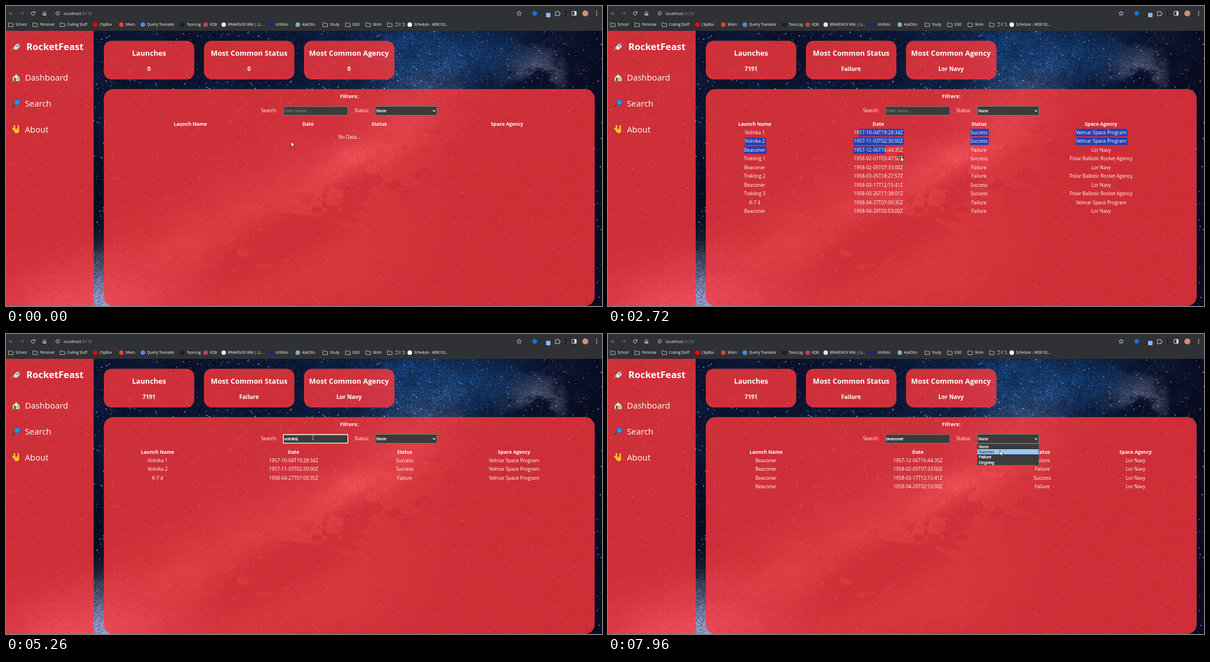
An HTML page with a canvas that plays this animation: 1054x531 px, repeating every 8000 ms.

```html
<!DOCTYPE html>
<html lang="en">
<head>
<meta charset="utf-8">
<title>Launch dashboard</title>
<style>
  html, body { margin: 0; width: 100%; height: 100%; overflow: hidden; background: #303134; }
  canvas { display: block; }
</style>
</head>
<body>
<canvas id="stage" width="1054" height="531"></canvas>
<script>
const W = 1054, H = 531, TOP = 44, LOOP = 8000;
const SANS = '"Open Sans", "Noto Sans", sans-serif';
const FORM = '"Liberation Sans", Arial, sans-serif';
const stage = document.getElementById('stage').getContext('2d');
const backdrop = document.createElement('canvas');
backdrop.width = W;
backdrop.height = H;
let ctx = backdrop.getContext('2d');

// ---------- drawing helpers ----------
// y is the middle of the capital letters
function text(str, x, y, size, { weight = 400, color = '#fff', align = 'left', font = SANS } = {}) {
  ctx.font = `${weight} ${size}px ${font}`;
  ctx.textAlign = align;
  ctx.fillStyle = color;
  ctx.fillText(str, x, y + size * 0.357);
  return ctx.measureText(str).width;
}
function formText(str, x, y, color = '#fff') {
  const width = text(str, x, y, 7.32, { color, font: FORM });
  ctx.strokeStyle = color;
  ctx.lineWidth = 0.25;
  ctx.strokeText(str, x, y + 7.32 * 0.357);
  return width;
}
function box(x, y, w, h, r, fill, stroke, line = 1) {
  ctx.beginPath();
  ctx.roundRect(x, y, w, h, r);
  if (fill) { ctx.fillStyle = fill; ctx.fill(); }
  if (stroke) { ctx.strokeStyle = stroke; ctx.lineWidth = line; ctx.stroke(); }
}
function dot(x, y, r, fill, stroke, line = 1) {
  box(x - r, y - r, 2 * r, 2 * r, r, fill, stroke, line);
}
function path(d, x, y, fill, stroke, line = 1) {
  ctx.save();
  ctx.translate(x, y);
  const shape = new Path2D(d);
  if (fill) { ctx.fillStyle = fill; ctx.fill(shape); }
  if (stroke) { ctx.strokeStyle = stroke; ctx.lineWidth = line; ctx.stroke(shape); }
  ctx.restore();
}

// ---------- night sky ----------
function hash(x, y) {
  let h = Math.imul(x, 374761393) ^ Math.imul(y, 668265263);
  h = Math.imul(h ^ (h >>> 13), 1274126177);
  return ((h ^ (h >>> 16)) >>> 0) / 4294967296;
}
function smooth(a, b, v) {
  const u = Math.min(1, Math.max(0, (v - a) / (b - a)));
  return u * u * (3 - 2 * u);
}
function noise(x, y) {
  const ix = Math.floor(x), iy = Math.floor(y);
  const u = smooth(0, 1, x - ix), v = smooth(0, 1, y - iy);
  const a = hash(ix, iy), b = hash(ix + 1, iy), c = hash(ix, iy + 1), d = hash(ix + 1, iy + 1);
  return a + (b - a) * u + (c - a) * v + (a - b - c + d) * u * v;
}
function fbm(x, y) {
  let sum = 0, total = 0;
  for (let i = 0, amp = 1; i < 5; i++, amp *= 0.6, x *= 2.1, y *= 2.1) {
    sum += amp * noise(x + i * 17, y);
    total += amp;
  }
  return sum / total;
}
const bell = (v, mid, spread) => Math.exp(-(((v - mid) / spread) ** 2));

function drawSky() {
  const image = ctx.createImageData(W, H);
  for (let y = TOP; y < H; y++) {
    for (let x = 0; x < W; x++) {
      // signed distance below the axis of the galaxy
      const d = ((x - 230) * 380 + (y - 480) * 720) / 814;
      const n = fbm(x / 62, y / 44);
      const band = bell(d, -5, 70) * (0.2 + 0.6 * n) * (1 - smooth(720, 850, x));
      const core = bell(x, 630, 100) * bell(d, 2, 30) * n;
      const haze = bell(d, 140, 110) * (1 - smooth(600, 850, x)) * (0.15 + 0.5 * n);
      const cloud = bell(x, 945, 50) * bell(y, 115, 38) * smooth(0.38, 0.58, n);
      const dust = smooth(0.46, 0.52, n) * bell(d, 60, 50) * smooth(260, 450, x);
      const light = (0.8 * band + 1.1 * core + 0.7 * haze) * (1 - 0.9 * Math.min(1, dust * 1.3)) + 0.4 * cloud;
      const blue = bell(x, 760, 170) * bell(y, 80, 85) * (0.2 + 0.9 * n)
        + 0.3 * (1 - smooth(500, 800, x)) * (1 - smooth(200, 400, y)) * n;
      const corner = bell(x, 130, 140) * bell(y, 530, 70);
      const grain = 0.6 + 0.8 * hash(x, y);
      const i = (y * W + x) * 4;
      image.data[i] = (8 + 150 * light + 12 * blue + 65 * corner) * grain;
      image.data[i + 1] = (10 + 135 * light + 62 * blue + 80 * corner) * grain;
      image.data[i + 2] = (30 + 130 * light + 105 * blue + 110 * corner) * grain;
      image.data[i + 3] = 255;
    }
  }
  ctx.putImageData(image, 0, 0);
  for (let i = 0; i < 9000; i++) {
    const x = hash(i, 1) * W, y = TOP + hash(i, 2) * (H - TOP);
    if (hash(i, 5) < 0.6 * smooth(650, 950, x) * smooth(200, 330, y) * (1 - smooth(1035, 1041, x))) continue;
    const bright = hash(i, 3) ** 3, size = 0.7 + bright * 1.2;
    ctx.fillStyle = `rgba(${120 + 100 * hash(i, 4)}, 190, 255, ${0.2 + 0.75 * bright})`;
    ctx.fillRect(x, y, size, size);
  }
}

// ---------- browser bars ----------
function folder(x) {
  path('M0.5 1.5h3l1.2 1.3h4v5.4h-8.2z', x, 28.3, null, '#d5d7da', 0.8);
}
function drawBrowser() {
  const ink = '#e3e4e6', dim = '#85878a';
  ctx.fillStyle = '#303134';
  ctx.fillRect(0, 0, W, TOP);
  path('M3.5 -3L0.5 0l3 3M0.5 0h6.5', 5, 13, null, dim);
  path('M3.5 -3l3 3l-3 3M6.5 0h-6.5', 25, 13, null, '#6b6d70');
  path('M2.4 -2A3.1 3.1 0 1 0 3.1 0.5M3.2 -3.2v2.2h-2.2', 48, 13, null, ink);
  path('M-3.3 0L0 -3.2L3.3 0M-2.4 -0.6v4h1.6v-2.4h1.6v2.4h1.6v-4', 68, 13, null, ink);
  dot(91.5, 13, 3.2, null, ink, 0.8);
  path('M0 -0.4v2M0 -1.8v0.8', 91.5, 13, null, ink, 0.9);
  const host = text('localhost', 102, 13, 7.4, { color: '#eee' });
  text(':5173', 102 + host, 13, 7.4, { color: '#989b9f' });

  path('M0 -4l1.1 2.7 2.9.2-2.2 1.9.7 2.8L0 2.1l-2.5 1.5.7-2.8L-4 -1.1l2.9-.2z', 907.5, 13, null, ink, 0.8);
  dot(935, 13, 4, '#1473d8');
  box(955, 12, 8, 8, 1.5, '#8fb4ee');
  path('M-3.5 -2.2h2.2a1.3 1.3 0 1 1 2.6 0h2v2.2a1.3 1.3 0 1 1 0 2.4v2h-6.8v-2.2a1.2 1.2 0 0 0 0-2.2z', 975, 12.6, null, ink, 0.9);
  ctx.fillStyle = '#111';
  ctx.fillRect(989, 8, 1.2, 10);
  box(1001, 9.5, 7.5, 7, 0.5, null, ink, 0.9);
  ctx.fillStyle = ink;
  ctx.fillRect(1005.3, 9.5, 3.2, 7);
  dot(1024.5, 13, 5.3, '#d08c78');
  for (const y of [9.5, 13, 16.5]) dot(1044.5, y, 0.9, ink);

  const folders = [[4, 'School'], [47, 'Personal'], [95, 'Coding Stuff'], [560, 'Study'],
    [600, 'EGD'], [636, 'Work'], [674, 'ゴミコ']];
  for (const [x, label] of folders) {
    folder(x);
    text(label, x + 13, 33, 6.25, { font: '"Open Sans", "Noto Sans CJK JP", "Noto Sans CJK", sans-serif' });
  }
  const sites = [[158, 'ClipBox', '#f00'], [204, 'Mivro', '#ea4335'], [242, 'Querly Translate', '#4d87ee'],
    [312, 'ToonLog', '#16202f'], [353, 'KQB', '#c5414e'], [385, 'BRAVENOX Wiki | Li...', '#dfe3e8'],
    [469, 'Unifolio', '#20228c'], [516, 'AskOtto', '#7ab8a6'], [714, 'Schedule - WEB102...', '#fff']];
  for (const [x, label, color] of sites) {
    dot(x, 33, 4, color);
    text(label, x + 7.5, 33, 6.25);
  }
}

// ---------- fixed parts of the page ----------
function drawPage() {
  const red = 'rgba(255, 56, 60, .8)';
  box(0, TOP, 155, H - TOP, 0, red);
  for (const x of [173, 350, 527]) box(x, 61.5, 160, 68.5, 14, red);
  box(173, 147, 868, 384, 17, red);

  // rocket
  path('M-8 6l3-5 3 3z', 18, 73, '#f5a623');
  path('M-5 -2l4-2 4 5-2 5-2-3-3-2zM-6 2l4 4-3 1z', 18, 73, '#a3263c');
  path('M8 -8C2 -8-3 -3-5 1l4 4C4 3 8 -2 8 -8z', 18, 73, '#dce3ea');
  path('M8 -8q-4 0-6 1.5l4.5 4.5q1.5-2 1.5-6z', 18, 73, '#c93a55');
  dot(20, 71, 1.7, '#4b7fae');
  // house
  path('M-6 0L0 -6L6 0V7H-6z', 18, 126, '#f2e2c4');
  path('M-8 0L0 -8L8 0L6.5 1.5L0 -5L-6.5 1.5z', 18, 126, '#a9583d');
  box(14, 127, 3.5, 6, 0, '#7b4a2d');
  box(19, 127, 3.5, 3.5, 0, '#63b7e6');
  box(11, 132, 5, 2, 1, '#58a846');
  box(20, 132, 5, 2, 1, '#58a846');
  // magnifier
  path('M-3 3L-7 7', 18, 172, null, '#3d4552', 2.4);
  dot(20, 170.5, 5, '#1e9be8', '#27506f', 1);
  // hand
  path('M-3 -7v8M3.5 -7v8M-6.5 -2l4 5', 18, 218, null, '#fcc42f', 2.6);
  path('M-4 -1h9q1 5-2 8h-4q-3-2-3-8z', 18, 218, '#fcc42f');
  path('M-1 -1v3M1.5 -1v3', 18, 218, null, '#c98a16', 1);

  text('RocketFeast', 36, 72.5, 16.6, { weight: 700 });
  text('Dashboard', 33.5, 126.5, 14.8, { weight: 500 });
  text('Search', 33.5, 172.5, 14.8, { weight: 500 });
  text('About', 33.5, 218.5, 14.8, { weight: 500 });

  const title = { weight: 700, align: 'center' };
  text('Launches', 253, 83.5, 12.7, title);
  text('Most Common Status', 430, 83.5, 12.7, title);
  text('Most Common Agency', 606.5, 83.5, 12.7, title);
  text('Filters:', 607, 159.5, 9.5, title);
  text('Search:', 451, 185.5, 8.3);
  text('Status:', 616, 185.5, 8.3);
  box(653, 177.5, 109, 16, 1, '#3b3b3b', '#858585', 0.9);
  formText('None', 655, 185.5);
  path('M-2.2 -1.2L0 1.2L2.2 -1.2', 757, 185.5, null, '#fff', 1.2);
}

// ---------- data ----------
const VELMAR = 'Velmar Space Program', NAVY = 'Lor Navy', ARMY = 'Polar Ballistic Rocket Agency';
const launches = [
  ['Volnika 1', '1957-10-04T19:28:34Z', 'Success', VELMAR],
  ['Volnika 2', '1957-11-03T02:30:00Z', 'Success', VELMAR],
  ['Beaconer', '1957-12-06T16:44:35Z', 'Failure', NAVY],
  ['Trekling 1', '1958-02-01T03:47:56Z', 'Success', ARMY],
  ['Beaconer', '1958-02-05T07:33:00Z', 'Failure', NAVY],
  ['Trekling 2', '1958-03-05T18:27:57Z', 'Failure', ARMY],
  ['Beaconer', '1958-03-17T12:15:41Z', 'Success', NAVY],
  ['Trekling 3', '1958-03-26T17:38:01Z', 'Success', ARMY],
  ['K-7 4', '1958-04-27T07:00:35Z', 'Failure', VELMAR],
  ['Beaconer', '1958-04-29T02:53:00Z', 'Failure', NAVY]
];
const headers = ['Launch Name', 'Date', 'Status', 'Space Agency'];
const columns = {
  empty: [326, 534, 660, 886],
  all: [259.5, 478, 656, 872],
  [VELMAR]: [268, 508.5, 705, 898.5],
  [NAVY]: [279.5, 548, 768, 933]
};
const ROW = 15.44;

// ---------- timeline ----------
const LOADED = 1780, FOCUS = 3490, SELECT_ALL = 5600, CLEAR = 5690, OPEN = 7720;
const DRAG = 2600, DRAG_END = 3080;
const firstKeys = [4340, 4460, 4590, 4730, 4950, 5010, 5260];
const secondKeys = [6060, 6240, 6390, 6450, 6690, 6760, 6840, 7050];
const pointer = [[0, 504, 240], [60, 506, 241], [430, 561, 265], [680, 558, 264], [820, 553, 258],
  [1050, 640, 224], [1240, 688, 268], [1450, 626, 305], [1570, 626, 302], [1720, 626, 302],
  [1780, 626, 306], [2100, 560, 290], [2570, 443, 222], [2630, 455, 234], [2720, 517, 266],
  [2860, 600, 325], [2960, 622, 345], [3080, 612, 330], [3160, 597, 310], [3430, 575, 183],
  [3640, 575, 183], [3790, 665, 181], [4000, 543, 183], [7250, 543, 183], [7400, 600, 246],
  [7540, 700, 215], [7660, 712, 186], [7760, 708, 186], [7960, 693, 206]];

function pointerAt(t) {
  const i = pointer.findIndex(k => k[0] > t);
  if (i < 0) return pointer.at(-1).slice(1);
  const [t0, x0, y0] = pointer[i - 1], [t1, x1, y1] = pointer[i];
  const u = (t - t0) / (t1 - t0);
  return [x0 + (x1 - x0) * u, y0 + (y1 - y0) * u];
}
const pressed = (keys, t) => keys.filter(k => k <= t).length;
const queryAt = t => t < CLEAR
  ? 'volnika'.slice(0, pressed(firstKeys, t))
  : 'beaconer'.slice(0, pressed(secondKeys, t));

// ---------- moving parts ----------
function drawSelection(t, row, col, center, width) {
  const [x, y] = pointerAt(t - 40);
  const last = Math.floor((y - 217) / ROW);
  let left = center - width / 2, right = left + width + 2;
  if (row > last || (row === 0 && col === 0)) return;
  if (row === 0 && col === 1) left = 443;
  if (row === last) right = Math.min(right, x);
  if (right > left) box(left, 217.5 + row * ROW, right - left, 13, 0, '#213fb3');
}
function drawTable(t, query) {
  const agency = { v: VELMAR, b: NAVY }[query[0]];
  const rows = t < LOADED ? [] : launches.filter(r => !agency || r[3] === agency);
  const centers = columns[t < LOADED ? 'empty' : agency || 'all'];
  headers.forEach((h, c) => text(h, centers[c], 208.5, 8.5, { weight: 700, align: 'center' }));
  if (t < 1570) text('No Data...', 607, 232, 8.4, { align: 'center' });
  rows.forEach((cells, r) => cells.forEach((cell, c) => {
    ctx.font = `400 8.45px ${SANS}`;
    if (t >= DRAG && t < DRAG_END) drawSelection(t, r, c, centers[c], ctx.measureText(cell).width);
    text(cell, centers[c], 224 + r * ROW, 8.45, { align: 'center' });
  }));
}
function drawInput(t, query) {
  const focused = t >= FOCUS && t < OPEN;
  box(490.5, 178, 114, 15.2, 1, '#3b3b3b', focused ? '#fff' : '#858585', focused ? 1.3 : 0.9);
  const marked = t >= SELECT_ALL && t < CLEAR;
  if (marked) box(492, 181, 23.5, 9, 0, '#3367d1');
  if (!query) formText('Enter Name...', 492, 185.5, '#757575');
  const end = 492 + (query ? formText(query, 492, 185.5) : 0);
  if (focused && !marked) {
    ctx.fillStyle = '#fff';
    ctx.fillRect(end + 0.3, 181.5, 0.7, 8);
  }
}
function drawOptions(t) {
  if (t < OPEN) return;
  box(653, 194.5, 109, 37.5, 0, '#3b3b3b', '#626262', 0.6);
  const active = t < 7860 ? 0 : 1;
  ['None', 'Success', 'Failure', 'Ongoing'].forEach((label, i) => {
    const y = 199.3 + i * 9.2;
    if (i === active) box(653.3, y - 4.6, 108.4, 9.2, 0, '#99c8ff');
    formText(label, 655.5, y, i === active ? '#3b4a5c' : '#fff');
  });
}
function drawPointer(t) {
  const [x, y] = pointerAt(t);
  if (x > 490 && x < 605 && y > 177 && y < 194) {
    path('M-1.5 -4h3M0 -4v8M-1.5 4h3', x, y, null, '#c4c4c4', 0.8);
    return;
  }
  if (t >= DRAG && t < DRAG_END) dot(x, y, 4.8, null, '#2a2022', 1);
  path('M0 0V9.3L2.2 7.3L3.7 10.8L5.2 10.1L3.7 6.8H6.7Z', x, y, '#fff', '#111', 0.7);
}

function draw() {
  const t = performance.now() % LOOP, query = queryAt(t);
  ctx.drawImage(backdrop, 0, 0);
  const stats = t < LOADED ? ['0', '0', '0'] : ['7191', 'Failure', NAVY];
  stats.forEach((s, i) => text(s, 253 + i * 176.8, 111.5, 10.1, { weight: 700, align: 'center' }));
  drawTable(t, query);
  drawInput(t, query);
  drawOptions(t);
  drawPointer(t);
  requestAnimationFrame(draw);
}

drawSky();
drawBrowser();
drawPage();
ctx = stage;
draw();
</script>
</body>
</html>
```
